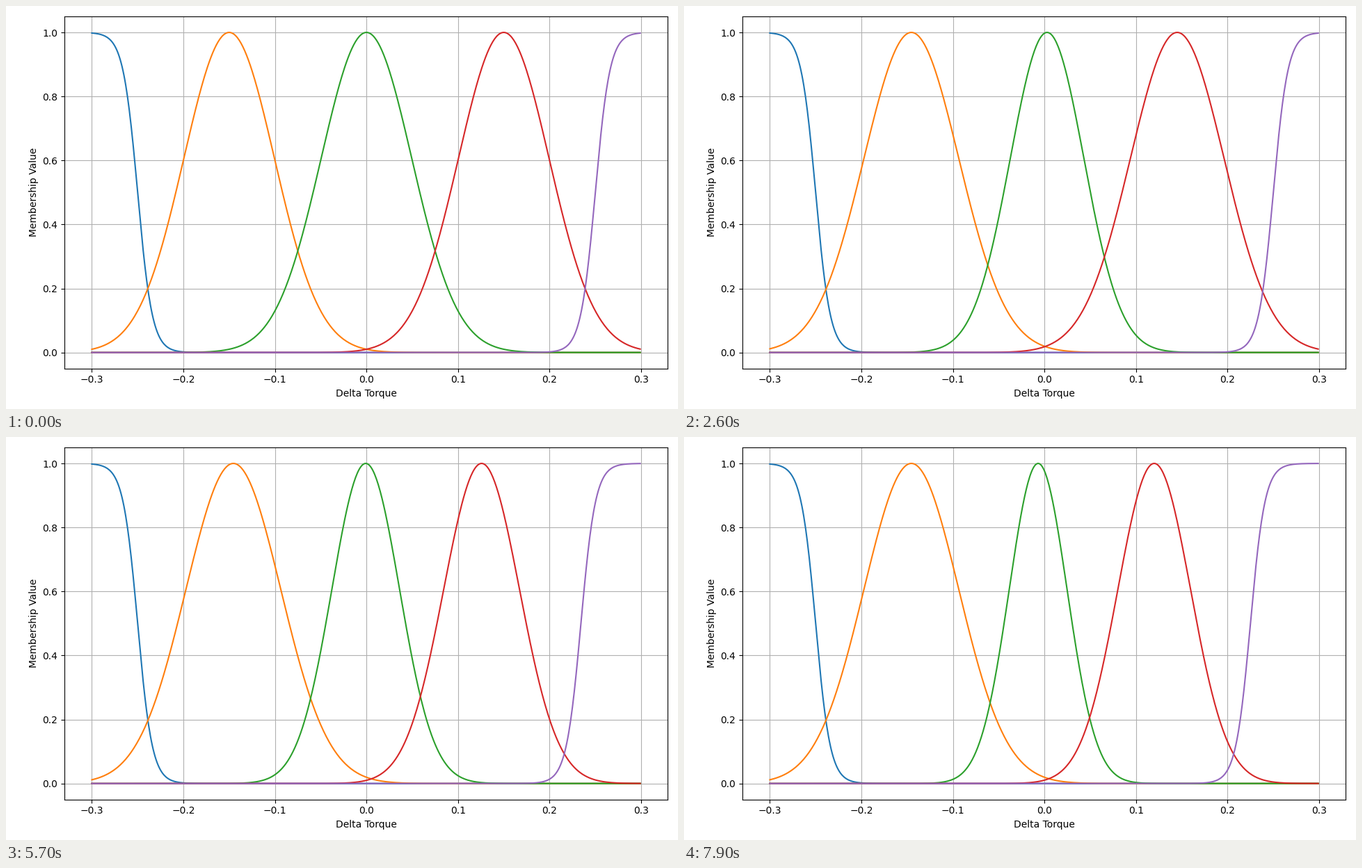
Animation, 966 px wide and 580 px high, one loop 8 s. Source, as a matplotlib script:

```python
import numpy as np
import matplotlib.pyplot as plt
from matplotlib.animation import FuncAnimation

WIDTH, HEIGHT, DPI = 966, 580, 100
FRAMES, INTERVAL = 80, 100
LEFT = 84
STEEPNESS = 125

x = np.arange(600) / 1000 - 0.3


def ramp(t, start, end):
    return np.clip((t - start) / (end - start), 0, 1)


def bell(centre, width):
    return np.exp(-0.5 * ((x - centre) / width) ** 2)


def sigmoid(centre, slope):
    return 1 / (1 + np.exp(-slope * (x - centre)))


def curves(t):
    """The five membership curves at t seconds, drifting in linear phases."""
    jump = ramp(t, 0, 0.8)
    back = ramp(t, 0.8, 1.9)
    settle = ramp(t, 1.9, 3.5)
    slide = ramp(t, 3.5, 6.5)
    last = ramp(t, 6.5, 7.9)
    widen = ramp(t, 0.8, 3.5)
    return [
        sigmoid(-0.25, -STEEPNESS),
        bell(-0.15 + 0.0068 * jump - 0.0022 * back,
             0.0495 + 0.0043 * jump - 0.002 * back),
        bell(0.0068 * jump - 0.0011 * back - 0.0065 * settle - 0.0061 * last,
             0.0495 - 0.0046 * jump - 0.0022 * back
             - 0.0057 * settle - 0.0054 * last),
        bell(0.15 + 0.0011 * jump - 0.0091 * widen - 0.0221 * slide,
             0.0495 - 0.002 * jump + 0.0055 * widen
             - 0.0158 * slide + 0.0025 * last),
        sigmoid(0.25 - 0.0214 * slide - 0.0036 * last, STEEPNESS),
    ]


fig, ax = plt.subplots(figsize=(WIDTH / DPI, HEIGHT / DPI), dpi=DPI)
lines = [ax.plot(x, y)[0] for y in curves(0)]
ax.set_xlabel("Delta Torque")
ax.set_ylabel("Membership Value")
ax.grid(True)
fig.tight_layout()
fig.subplots_adjust(left=LEFT / WIDTH)


def update(frame):
    for line, y in zip(lines, curves(frame * INTERVAL / 1000)):
        line.set_ydata(y)
    return lines


anim = FuncAnimation(fig, update, frames=FRAMES, interval=INTERVAL,
                     init_func=lambda: update(0), repeat=True, repeat_delay=0)
plt.show()
```
